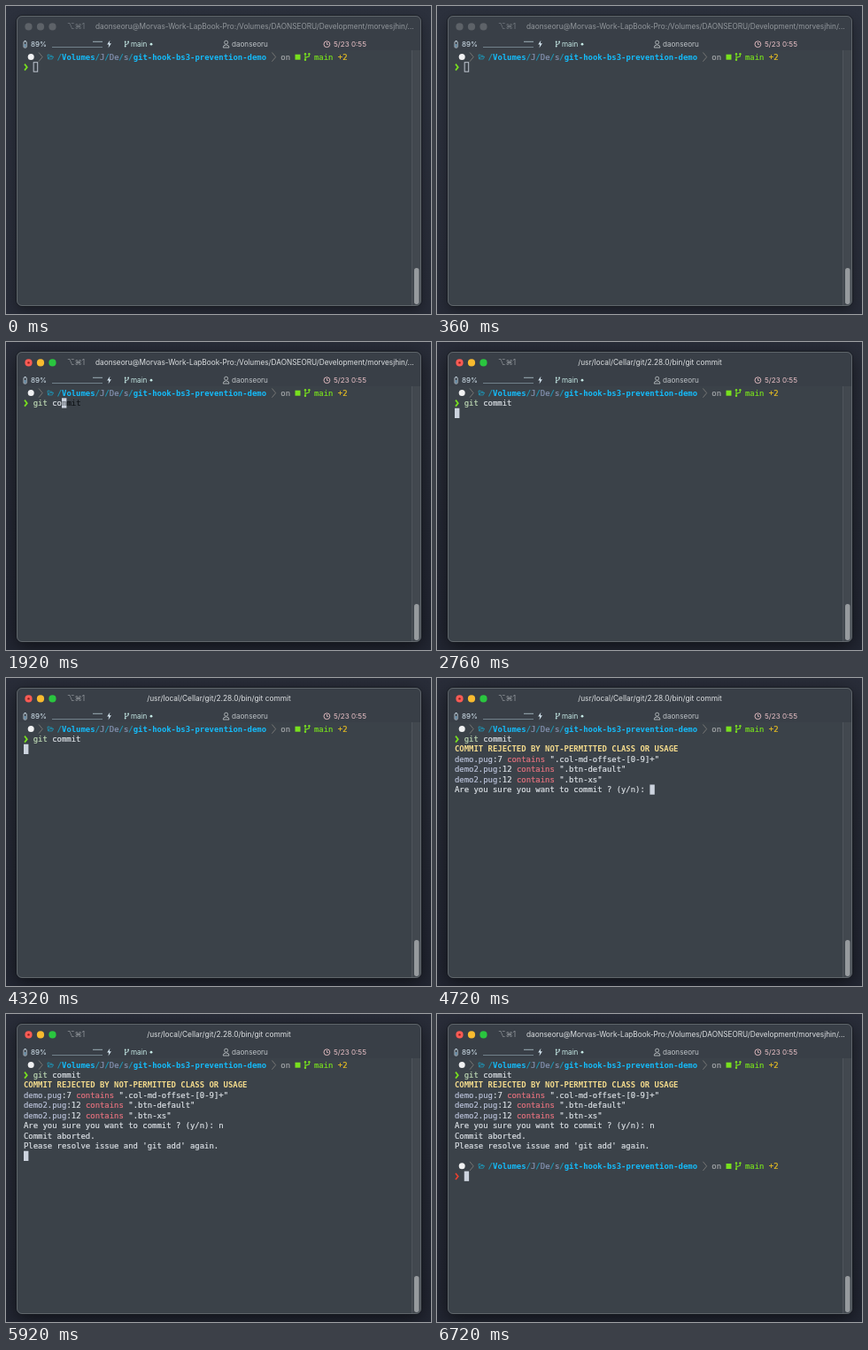
Recreate the animation shown at these times as an HTML page with a canvas. Size 480 by 348 pixels, loop 6840 ms.

```html
<!DOCTYPE html>
<html lang="en">
<head>
<meta charset="utf-8">
<title>Commit hook demo</title>
<style>
html, body { margin: 0; width: 100%; height: 100%; overflow: hidden; background: #232733; }
canvas { display: block; width: 480px; height: 348px; }
</style>
</head>
<body>
<canvas id="stage"></canvas>
<script>
const W = 480, H = 348, LOOP = 6840;
const COL = 5.376, ROW = 11.43, LEFT = 20, TOP = 51.9;
const MONO = '"DejaVu Sans Mono", "Noto Sans Mono", monospace';
const SANS = 'Inter, Roboto, "DejaVu Sans", sans-serif';
const C = {
  text: '#dce1e6', cursor: '#ccd3de', green: '#78e01e', red: '#e8402f', grey: '#a4a8aa',
  anchor: '#14bcfb', slash: '#1c9bbd', short: '#8795b4', gold: '#e6bd22', title: '#dcdfe1',
  rose: '#ecc3c8', mint: '#c4e8e4', ice: '#d4e4ef', file: '#b9c1d8', pink: '#e6727e',
  cmd: '#bfdab5', head: '#f3da8c', ghost: '#101418'
};

// Times of each event in ms
const FOCUS = 400, ENTER = 2400, ANSWER = 5680, ABORT = 5880, DONE = 5960;
const KEYS = [1440, 1520, 1600, 1690, 1790, 1880, 1970, 2040, 2100, 2150];
const REPORT = [4440, 4480, 4520, 4560, 4600];

const COMMAND = 'git commit';
const USER = 'daonseoru';
const SHELL = USER + '@Morvas-Work-LapBook-Pro:/Volumes/DAONSEORU/Development/morvesjhin/...';
const RUNNING = '/usr/local/Cellar/git/2.28.0/bin/git commit';
const FINDINGS = [
  ['demo.pug', ':7', '".col-md-offset-[0-9]+"'],
  ['demo2.pug', ':12', '".btn-default"'],
  ['demo2.pug', ':12', '".btn-xs"']
];
const QUESTION = 'Are you sure you want to commit ? (y/n): ';

const canvas = document.getElementById('stage');
const ctx = canvas.getContext('2d');
const dpr = window.devicePixelRatio || 1;
canvas.width = W * dpr;
canvas.height = H * dpr;

const colX = c => LEFT + c * COL;
const rowY = r => TOP + r * ROW;

function box(x, y, w, h, color) {
  ctx.fillStyle = color;
  ctx.fillRect(x, y, w, h);
}

function rounded(x, y, w, h, r) {
  ctx.beginPath();
  ctx.roundRect(x, y, w, h, r);
}

function dot(x, y, r, color) {
  ctx.fillStyle = color;
  ctx.beginPath();
  ctx.arc(x, y, r, 0, Math.PI * 2);
  ctx.fill();
}

function ring(x, y, r, color, width = 0.9) {
  ctx.strokeStyle = color;
  ctx.lineWidth = width;
  ctx.beginPath();
  ctx.arc(x, y, r, 0, Math.PI * 2);
  ctx.stroke();
}

function line(points, color, width = 0.9) {
  ctx.strokeStyle = color;
  ctx.lineWidth = width;
  ctx.beginPath();
  points.forEach(([x, y]) => ctx.lineTo(x, y));
  ctx.stroke();
}

function label(str, x, y, color, size = 8.1, align = 'left') {
  ctx.font = `${size}px ${SANS}`;
  ctx.textAlign = align;
  ctx.fillStyle = color;
  ctx.fillText(str, x, y);
}

// Regular text gets a hairline outline for a medium weight
function mono(str, col, row, color, weight = 400) {
  const x = colX(col), y = rowY(row) + 8.6;
  ctx.font = `${weight} 8.93px ${MONO}`;
  ctx.textAlign = 'left';
  ctx.fillStyle = color;
  ctx.fillText(str, x, y);
  if (weight > 400) return;
  ctx.strokeStyle = color;
  ctx.lineWidth = 0.18;
  ctx.strokeText(str, x, y);
}

// Draws [text, color, weight] runs one after another
function runs(list, col, row) {
  for (const [str, color, weight] of list) {
    mono(str, col, row, color, weight);
    col += str.length;
  }
}

function branch(x, y, color, s = 1) {
  line([[x, y + 2 * s], [x, y + 6 * s]], color, s);
  line([[x + 4 * s, y + 2 * s], [x + 4 * s, y + 3.4 * s], [x, y + 5 * s]], color, s);
  dot(x, y + s, 1.1 * s, color);
  dot(x + 4 * s, y + s, 1.1 * s, color);
  dot(x, y + 7 * s, 1.1 * s, color);
}

function drawWindow(active) {
  const sky = ctx.createLinearGradient(0, 0, 0, H);
  sky.addColorStop(0, active ? '#292d39' : '#2c313d');
  sky.addColorStop(1, active ? '#222632' : '#272b37');
  box(0, 0, W, H, sky);

  ctx.save();
  ctx.shadowColor = active ? 'rgba(0,0,0,.55)' : 'rgba(0,0,0,.35)';
  ctx.shadowBlur = (active ? 20 : 14) * dpr;
  ctx.shadowOffsetY = 5 * dpr;
  ctx.fillStyle = '#3b4249';
  rounded(12, 11, 457, 328, 6);
  ctx.fill();
  ctx.restore();

  ctx.save();
  rounded(12, 11, 457, 328, 6);
  ctx.clip();
  box(12, 11, 457, 39, '#393f47');
  box(458, 50, 11, 289, '#42484f');
  box(458, 50, 0.8, 289, '#535960');
  ctx.restore();

  ctx.fillStyle = '#969a9e';
  rounded(461, 296, 5.5, 41, 2.7);
  ctx.fill();
  ctx.lineWidth = 0.8;
  ctx.strokeStyle = '#14171d';
  rounded(11.7, 10.7, 457.6, 328.6, 6.3);
  ctx.stroke();
  ctx.strokeStyle = '#6b7177';
  rounded(12.5, 11.5, 456, 327, 5.5);
  ctx.stroke();

  const lights = active ? ['#fc5b54', '#f9bb2f', '#2ac63f'] : ['#5d6268', '#5d6268', '#5d6268'];
  lights.forEach((color, i) => dot(25.5 + 13.5 * i, 23.4, 4.1, color));
  if (active) dot(25.5, 23.4, 1.2, '#8c1f1a');
}

function drawTitle(t, active) {
  const color = active ? C.title : '#92979c';
  label('⌥⌘1', 69, 26.4, active ? '#92979c' : '#747a80', 8.3);
  if (t >= ENTER && t < DONE) label(RUNNING, 240.5, 26.4, color, 8.35, 'center');
  else label(SHELL, 101, 26.4, color, 8.25);
}

function drawStatus() {
  ctx.strokeStyle = C.ice;
  ctx.lineWidth = 0.8;
  rounded(20, 40, 3.2, 7, 0.9);
  ctx.stroke();
  box(20.9, 39, 1.4, 0.9, C.ice);
  box(20.9, 43, 1.4, 3.2, '#6f9fc0');
  label('89%', 28, 46, C.ice);

  line([[52, 46.5], [109, 46.5]], '#7f929d', 0.8);
  line([[98, 40.3], [109, 40.3]], '#a9bcc6', 0.9);
  ctx.fillStyle = C.ice;
  ctx.beginPath();
  [[117.4, 38.8], [114.2, 43.6], [116.3, 43.6], [115.5, 47.6], [118.9, 42.2], [116.8, 42.2]]
    .forEach(([x, y]) => ctx.lineTo(x, y));
  ctx.fill();

  branch(134.7, 39.6, C.mint, 0.85);
  label('main', 141, 46, C.mint);
  dot(164, 43.2, 1.4, C.mint);

  ring(248.6, 41.2, 2, '#b4b9bd');
  ctx.beginPath();
  ctx.moveTo(245.2, 47);
  ctx.quadraticCurveTo(245.2, 43.9, 248.6, 43.9);
  ctx.quadraticCurveTo(252, 43.9, 252, 47);
  ctx.closePath();
  ctx.stroke();
  label(USER, 255, 46, '#bec3c7');

  ring(362.4, 43.2, 3.4, C.rose);
  line([[362.4, 41], [362.4, 43.4], [364.2, 43.4]], C.rose, 0.8);
  label('5/23 0:55', 370, 46, C.rose);
}

function drawPrompt(row, mark) {
  const y = rowY(row);
  const arrow = x => line([[x, y + 0.6], [x + 4.2, y + 5.7], [x, y + 10.8]], '#85837f', 0.8);
  dot(28.2, y + 5.6, 3.5, '#f0f1f2');
  arrow(37);
  line([[47.6, y + 8], [47, y + 3.2], [49, y + 3.2], [49.8, y + 4.2], [52, y + 4.2], [52, y + 5.4]], C.slash, 0.8);
  line([[47.6, y + 8], [49, y + 5.4], [53.6, y + 5.4], [52.2, y + 8], [47.6, y + 8]], C.slash, 0.8);
  runs([
    ['/', C.slash], ['Volumes', C.anchor, 700], ['/', C.slash], ['J', C.short],
    ['/', C.slash], ['De', C.short], ['/', C.slash], ['s', C.short], ['/', C.slash],
    ['git-hook-bs3-prevention-demo', C.anchor, 700]
  ], 7, row);
  arrow(300.4);
  mono('on', 54, row, C.grey);
  box(326.5, y + 2.8, 6, 6, C.green);
  branch(338, y + 1.2, C.green, 1.1);
  mono('main', 61, row, C.green);
  mono('+2', 66, row, C.gold);

  const m = rowY(row + 1);
  line([[21, m + 2.3], [23.8, m + 5.8], [21, m + 9.3]], mark, 1.7);
}

function drawCursor(col, row, active) {
  const x = colX(col), y = rowY(row);
  if (active) return box(x, y, COL, ROW - 0.2, C.cursor);
  ctx.strokeStyle = C.cursor;
  ctx.lineWidth = 0.9;
  ctx.strokeRect(x + 0.4, y + 0.4, COL - 0.8, ROW - 1);
}

function drawReport(t) {
  if (t >= REPORT[0]) mono('COMMIT REJECTED BY NOT-PERMITTED CLASS OR USAGE', 0, 2, C.head, 700);
  FINDINGS.forEach(([file, num, rule], i) => {
    if (t < REPORT[i + 1]) return;
    runs([[file, C.file], [num, C.text], [' contains ', C.pink], [rule, C.text]], 0, 3 + i);
  });
  if (t >= REPORT[4]) mono(QUESTION + (t >= ANSWER ? 'n' : ''), 0, 6, C.text);
  if (t >= ABORT) {
    mono('Commit aborted.', 0, 7, C.text);
    mono("Please resolve issue and 'git add' again.", 0, 8, C.text);
  }
}

function cursorAt(t, typed) {
  if (t < ENTER) return [2 + typed, 1];
  if (t >= DONE) return [2, 11];
  if (t >= ABORT) return [0, 9];
  if (t >= REPORT[4]) return [QUESTION.length + (t >= ANSWER ? 1 : 0), 6];
  return [0, 2 + REPORT.filter(k => t >= k).length];
}

function draw(t) {
  const active = t >= FOCUS;
  const typed = KEYS.filter(k => t >= k).length;
  ctx.setTransform(dpr, 0, 0, dpr, 0, 0);
  drawWindow(active);
  drawTitle(t, active);
  drawStatus();
  drawPrompt(0, C.green);
  drawCursor(...cursorAt(t, typed), active);
  runs([
    [COMMAND.slice(0, Math.min(typed, 3)), C.cmd],
    [COMMAND.slice(3, Math.max(typed, 3)), C.text]
  ], 2, 1);
  if (typed) {
    mono(COMMAND.slice(typed, typed + 1), 2 + typed, 1, '#6b727a');
    mono(COMMAND.slice(typed + 1), 3 + typed, 1, C.ghost);
  }
  drawReport(t);
  if (t >= DONE) drawPrompt(10, C.red);
}

const start = performance.now();
function tick() {
  draw((performance.now() - start) % LOOP);
  requestAnimationFrame(tick);
}
tick();
</script>
</body>
</html>
```
